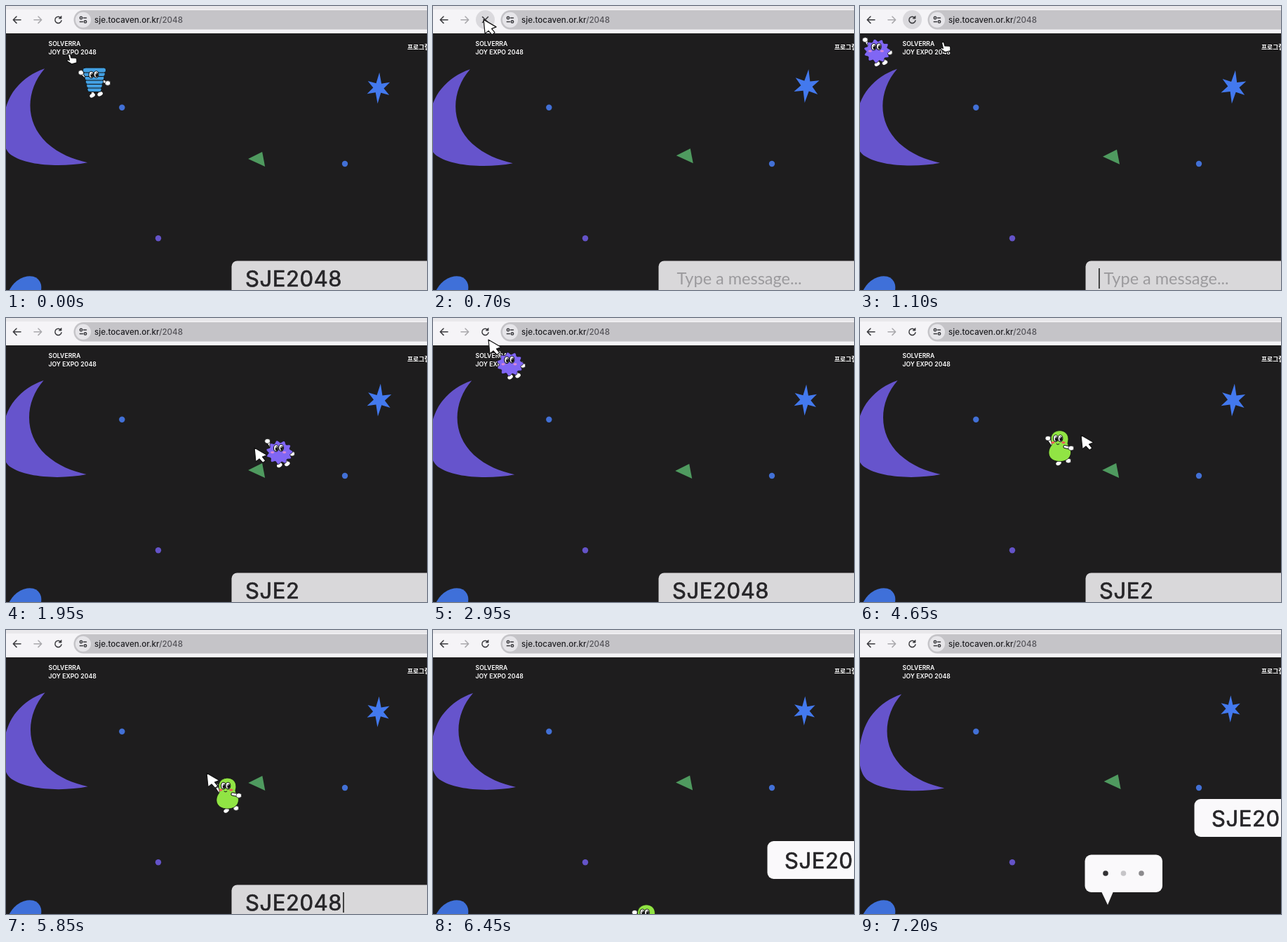
These frames come from a looping animation (600 by 405 pixels, 7.25 s). An HTML page:

```html
<!DOCTYPE html>
<html lang="ko">
<head>
<meta charset="utf-8">
<style>
  html, body { margin: 0; width: 100%; height: 100%; overflow: hidden; background: #1e1d1e; }
  svg { display: block; width: 600px; height: 405px; }
  text { font-family: Inter, sans-serif; }
  .logo { font-size: 8.7px; font-weight: 600; fill: #fff; }
  .menu { font: 700 8.8px "Noto Sans CJK KR", "Noto Sans CJK", sans-serif; fill: #fff; }
  .url { font-size: 11.6px; font-weight: 500; fill: #202024; }
  .typed { font-size: 31px; letter-spacing: .6px; fill: #262528; stroke: #262528; stroke-width: .7; stroke-linejoin: round; }
  .hint { font: 23.5px Lato, sans-serif; fill: #9b9a9d; }
  .icon { fill: none; stroke: #3a3a3e; stroke-width: 1.5; stroke-linecap: round; stroke-linejoin: round; }
</style>
</head>
<body>
<svg viewBox="0 0 600 405">
  <rect width="600" height="405" fill="#1e1d1e"/>

  <path id="moon" fill="#6654cc" d="M55 89C28 120 26 165 58 195C76 211 95 218 116 223C80 230 30 228 7 212C-14 196-6 140 14 117C26 103 38 95 55 89Z"/>
  <path id="star" fill="#4379ee"/>
  <path id="tri" fill="#4f9a5f" d="M345 218L365 208L369 229Z"/>
  <circle cx="165.3" cy="144.7" r="4.2" fill="#4270d6"/>
  <circle cx="483" cy="225" r="4.2" fill="#4270d6"/>
  <circle cx="217" cy="331.3" r="4.2" fill="#6453c8"/>
  <ellipse rx="28" ry="20" transform="translate(26 409.5) rotate(-45)" fill="#3f70d9"/>

  <g id="bar">
    <rect x="321.5" y="363.5" width="300" height="70" rx="8" fill="#d9d8da"/>
    <text id="hint" class="hint" x="347.5" y="397">Type a message...</text>
    <text id="typed" class="typed" x="341" y="400"></text>
    <rect id="caret" y="374" width="1.8" height="29" fill="#333"/>
  </g>

  <g id="sent">
    <rect x="476.5" y="241" width="180" height="54" rx="9" fill="#faf9fb"/>
    <text class="typed" x="501" y="280">SJE2048</text>
  </g>
  <g id="reply">
    <rect x="320.5" y="320.5" width="110.5" height="53.5" rx="9" fill="#faf9fb"/>
    <path d="M344 373H361L353 392Z" fill="#faf9fb"/>
    <g id="dots">
      <circle cx="350" cy="347" r="3.8"/>
      <circle cx="375.5" cy="347" r="3.8"/>
      <circle cx="401" cy="347" r="3.8"/>
    </g>
  </g>

  <text class="logo" x="60.5" y="56.7">SOLVERRA</text>
  <text class="logo" x="60.5" y="68.7">JOY EXPO 2048</text>
  <text class="menu" x="572" y="62">프로그램</text>

  <g id="pals"></g>

  <rect width="600" height="39" fill="#f5f4f7"/>
  <rect width="600" height="5" fill="#e9e8eb"/>
  <circle id="hover" cx="74.5" cy="19.5" r="13.5" fill="#dad9dd"/>
  <rect x="96.5" y="6" width="560" height="27.5" rx="13.75" fill="#c5c4c8"/>
  <circle cx="110" cy="19.7" r="11" fill="#e6e5e9"/>
  <path class="icon" d="M21 19.7H10.5M15 15L10.3 19.7L15 24.4"/>
  <path class="icon" style="stroke:#a9a8ac" d="M40 19.7H50.5M46 15L50.7 19.7L46 24.4"/>
  <g id="reload" class="icon">
    <path d="M78.3 17.3A4.6 4.6 0 1 0 79 20.8"/>
    <path d="M79 14.5V18H75.5Z" fill="#3a3a3e" stroke-width=".8"/>
  </g>
  <path id="stop" class="icon" d="M70.5 15.5L78.5 23.5M78.5 15.5L70.5 23.5"/>
  <g class="icon">
    <circle cx="107" cy="17" r="1.7"/><path d="M110.5 17H114.5M105.3 22.4H109.5"/><circle cx="113" cy="22.4" r="1.7"/>
  </g>
  <text class="url" x="126" y="24">sje.tocaven.or.kr<tspan fill="#55545a">/2048</tspan></text>

  <g id="mouse" fill="#fff" stroke="#111" stroke-width="1.2" stroke-linejoin="round">
    <path id="arrow" d="M0 0L2 20L7 16L12 21.5L16 18.5L11.5 13L18 10.5Z"/>
    <path id="hand" transform="rotate(-14) scale(1.1)" d="M-1.5 1C-1.5-1 1.5-1 1.5 1V5L7 6.5C8.2 7 8.3 8 8 9L7 13H0L-4.5 8C-5.2 6-3 5.8-1.5 7.5Z"/>
  </g>
</svg>

<script>
const LOOP = 7250, STEP = 50, LAG = 150;
const RELOADS = [-2400, 500, 3200];
const WORD = 'SJE2048';

// Pointer way points: time, x, y.
const WAY = [
  [0, 90, 69], [250, 74, 20], [800, 76, 23], [1100, 118, 52], [1780, 350, 150],
  [1950, 354, 185], [2750, 82, 32], [2950, 79, 31], [3150, 74, 20], [3800, 77, 23],
  [4500, 250, 148], [4650, 315, 167], [5680, 280, 198], [5850, 286, 204], [6450, 262, 440]
];

const $ = id => document.getElementById(id);
const show = (id, on) => $(id).setAttribute('visibility', on ? 'visible' : 'hidden');
const move = (id, value) => $(id).setAttribute('transform', value);
const clamp = v => Math.min(1, Math.max(0, v));
const smooth = v => clamp(v) ** 2 * (3 - 2 * clamp(v));
const easeOut = (p, from, len) => 1 - (1 - clamp((p - from) / len)) ** 3;
const mix = (a, b, k) => a + (b - a) * k;

// Smooth curve through the way points.
function pointer(t) {
  const last = WAY.length - 1;
  const pick = i => WAY[Math.min(last, Math.max(0, i))];
  const time = Math.min(WAY[last][0], Math.max(0, t));
  const i = Math.max(0, WAY.findIndex(w => w[0] >= time) - 1);
  const [a, b, c, d] = [-1, 0, 1, 2].map(n => pick(i + n));
  const span = c[0] - b[0], k = (time - b[0]) / span;
  return [1, 2].map(j => {
    const m = (c[j] - a[j]) / (c[0] - a[0]) * span;
    const n = (d[j] - b[j]) / (d[0] - b[0]) * span;
    return mix(b[j], c[j], smooth(k)) + k * (1 - k) * ((1 - k) * m - k * n);
  });
}

// The mascot walks in from the left, then trails the pointer.
function follower(t, p) {
  const [x, y] = pointer(t - LAG), k = smooth(p / 1500);
  return [mix(-30, x + 36, k), mix(60, y + 38, k)];
}

// Mascots, drawn around their own centre.
const limb = (x1, y1, x2, y2) =>
  `<path d="M${x1} ${y1}L${x2} ${y2}" stroke="#111" stroke-width="5"/>` +
  `<path d="M${x1} ${y1}L${x2} ${y2}" stroke="#fff" stroke-width="3"/>` +
  `<ellipse cx="${x2}" cy="${y2}" rx="4" ry="3.4" fill="#fff" stroke="#111" stroke-width=".7"/>`;
const foot = (x1, y1, x, y) =>
  `<path d="M${x1} ${y1}L${x} ${y}" stroke="#fff" stroke-width="3"/>` +
  `<ellipse cx="${x - 1}" cy="${y}" rx="4" ry="2.7" transform="rotate(-30 ${x} ${y})" fill="#fff"/>`;
const eye = (x, y) =>
  `<ellipse cx="${x}" cy="${y}" rx="3.4" ry="4.8" fill="#fff" stroke="#111" stroke-width="1.1"/>` +
  `<ellipse cx="${x + .8}" cy="${y + .6}" rx="1.9" ry="3.2" fill="#111"/>` +
  `<circle cx="${x + .2}" cy="${y - 1}" r=".8" fill="#fff"/>`;
const cheek = (x, y, c) => `<ellipse cx="${x}" cy="${y}" rx="2.6" ry="1.6" fill="${c}"/>`;

function coil() {
  let bands = '';
  for (let i = 5; i >= 0; i--) {
    const w = 33 - i * 2.6;
    bands += `<rect x="${-w / 2}" y="${-19 + i * 5.5}" width="${w}" height="7" rx="3" fill="#43a0e2" stroke="#111"/>`;
  }
  return limb(-13, -6, -19, -12) + limb(12, 0, 19, 3) + foot(-3, 14, -2, 20) + foot(6, 14, 9, 18) +
    bands + eye(-4.5, -9) + eye(2.5, -9.5);
}
function fuzz() {
  const pts = Array.from({ length: 132 }, (_, i) => {
    const a = i / 66 * Math.PI, r = 16 + 1.7 * Math.cos(11 * a + .6);
    return `${r * 1.08 * Math.cos(a)} ${r * .97 * Math.sin(a)}`;
  });
  return limb(-12, -8, -17, -16) + limb(13, 1, 18, 2) + foot(0, 12, 1, 18) + foot(9, 12, 12, 16) +
    `<path d="M${pts.join('L')}Z" fill="#8066f4" stroke="#111" stroke-width=".8"/>` +
    cheek(-10, 0, '#d987d8') + cheek(7, 0, '#d987d8') + eye(-4.8, -6) + eye(2.5, -6.5);
}
function pear() {
  return limb(-11, -5, -17, -14) + foot(-2, 16, -1, 21) + limb(8, 13, 12, 18) +
    '<path d="M-13-13C-13-29 12-29 12-13C12-9 10-7 12-4C20 7 14 19 0 19C-16 19-20 6-12-4C-11-7-13-9-13-13Z" fill="#91e444" stroke="#111" stroke-width=".8"/>' +
    limb(7, -2, 16, 0) + cheek(-10, -8, '#ef5a55') + cheek(5, -8, '#ef5a55') +
    eye(-6, -14) + eye(.5, -14) + '<path d="M-5-6Q-3-4-1-6" stroke="#111"/>';
}
const pals = [coil, fuzz, pear].map(draw => {
  const g = document.createElementNS('http://www.w3.org/2000/svg', 'g');
  g.setAttribute('fill', 'none');
  g.setAttribute('stroke-linecap', 'round');
  g.innerHTML = draw();
  $('pals').append(g);
  return g;
});

function starPath(x, y, turn, r) {
  const pts = Array.from({ length: 12 }, (_, i) => {
    const a = (i * 30 + turn - 90) * Math.PI / 180;
    const d = r * (i % 2 ? .34 : i % 6 ? .82 : 1);
    return `${x + d * Math.cos(a)} ${y + d * Math.sin(a)}`;
  });
  return `M${pts.join('L')}Z`;
}

// Scenery drifts along shallow arcs while the page is open; s is in seconds.
function drawScenery(s) {
  move('moon', `translate(${.4 * s * s - 2.2} ${.5 * (s - 1.8) ** 2})`);
  move('tri', `translate(${.6 * (s - 1.9) ** 2} ${-.9 * (s - 2.5) ** 2})`);
  const y = 117.3 - 1.1 * (s - 1.9) ** 2;
  $('star').setAttribute('d', starPath(532.5 - .28 * s * s, y, 7 - 1.5 * s, 24 - .3 * s * s));
}

function drawChat(p) {
  const count = Math.floor(clamp((p - 850) / 150 / WORD.length) * WORD.length);
  $('typed').textContent = WORD.slice(0, count);
  show('hint', !count);
  show('caret', (p + 400) % 1000 < 500);
  $('caret').setAttribute('x', count ? 342 + $('typed').getComputedTextLength() : 340);
  move('bar', `translate(0 ${50 * easeOut(p, 2750, 250)})`);

  const rise = 150 * (1 - easeOut(p, 2900, 300)) + 60 * (1 - easeOut(p, 3550, 250));
  show('sent', p >= 2900);
  move('sent', `translate(0 ${rise})`);

  const size = easeOut(p, 3600, 200);
  show('reply', size > 0);
  move('reply', `translate(353 392) scale(${size}) translate(-353 -392)`);
  const head = Math.floor(Math.max(0, p - 3400) / 200);
  const tones = ['#333235', '#c6c5c8', '#8b8a8d'];
  [...$('dots').children].forEach((dot, i) => dot.setAttribute('fill', tones[(i + 2 * head) % 3]));
}

function drawPointer(t, p, run) {
  const [x, y] = pointer(t);
  const onLogo = x > 60 && x < 127 && y > 46 && y < 72;
  const onReload = Math.hypot(x - 74.5, y - 19.5) < 10;
  move('mouse', `translate(${x} ${y})`);
  show('hand', onLogo);
  show('arrow', !onLogo);
  show('hover', onReload || p < 750);
  show('stop', p < 300);
  show('reload', p >= 300);
  pals.forEach((g, i) => {
    g.setAttribute('visibility', i === run ? 'visible' : 'hidden');
    g.setAttribute('transform', `translate(${follower(t, p)})`);
  });
}

const start = performance.now();
function tick() {
  const t = Math.floor(((performance.now() - start) % LOOP) / STEP) * STEP;
  const run = RELOADS.filter(r => r <= t).length - 1;
  const p = t - RELOADS[run];
  drawScenery(p / 1000);
  drawChat(p);
  drawPointer(t, p, run);
  requestAnimationFrame(tick);
}
tick();
</script>
</body>
</html>
```
